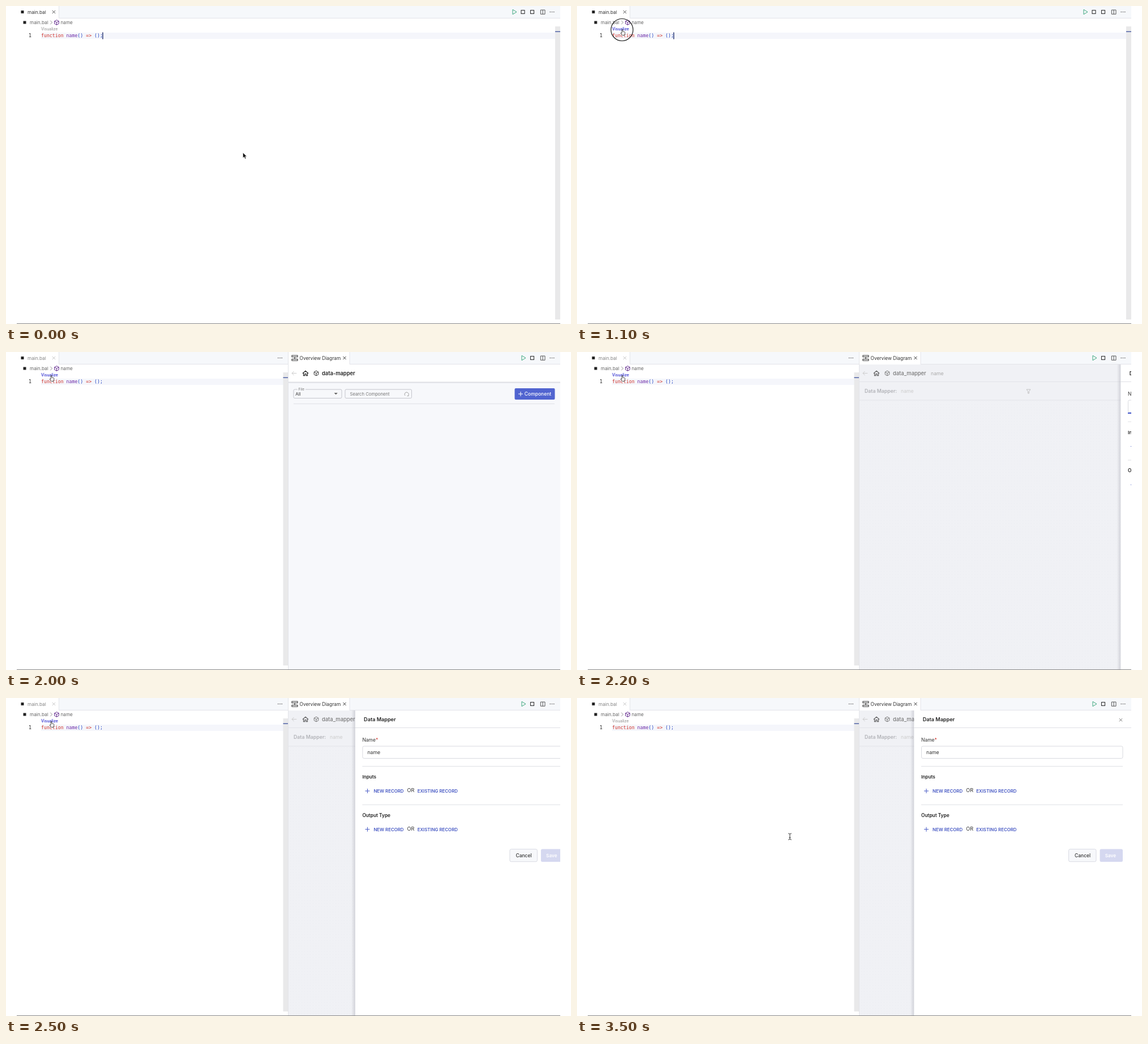
Write an HTML page that moves like this. It is 998 px wide and 561 px high and loops after 5.1 s.

```html
<!DOCTYPE html>
<html lang="en">
<head>
<meta charset="utf-8">
<title>Data mapper</title>
<style>
html, body { margin: 0; width: 100%; height: 100%; overflow: hidden; background: #fff; }
svg { display: block; width: 100%; height: 100%; }
text { font-family: Inter, Roboto, sans-serif; font-size: 8.2px; fill: #333; white-space: pre; }
.mono { font-family: "DejaVu Sans Mono", "Noto Sans Mono", monospace; font-size: 8.23px; fill: #1a3fc0; }
.key { fill: #d0342c; }
.fn { fill: #6f2da8; }
.crumb { fill: #666; }
.mid { font-weight: 500; }
.bold { font-weight: 600; fill: #222; }
.link { font-weight: 600; font-size: 7.85px; fill: #4759c4; }
.line { fill: none; stroke: currentColor; }
.rule { stroke: #dfe0e5; }
.edge { stroke: #e3e4e9; }
</style>
</head>
<body>
<svg viewBox="0 0 998 561" preserveAspectRatio="none">
  <defs>
    <path id="close" class="line" d="M-2.6-2.6 2.6 2.6M2.6-2.6-2.6 2.6"/>
    <path id="plus" class="line" d="M-4 0H4M0-4V4"/>
    <g id="dots" fill="#444"><circle cx="-3.2" r=".8"/><circle r=".8"/><circle cx="3.2" r=".8"/></g>
    <path id="play" d="M-3-4.2 4 0-3 4.2Z" fill="none" stroke="#3aa57c"/>
    <rect id="stop" x="-3" y="-3" width="6" height="6" fill="none" stroke="#333" stroke-width="1.1"/>
    <path id="cube" class="line" d="M0-4.3 3.8-2.2V2.2L0 4.3-3.8 2.2V-2.2ZM-3.8-2.2 0 0 3.8-2.2M0 0V4.3"/>
    <path id="home" d="M-5 .3 0-4.3 5 .3M-3.5-.5V4.2H-1.2V1H1.2V4.2H3.5V-.5" fill="none" stroke="#222" stroke-width="1.2"/>
    <path id="back" class="line" d="M4.3 0H-4M-.5-3.5-4 0-.5 3.5"/>
    <g id="choice">
      <use href="#plus" x="617" color="#4759c4"/>
      <text class="link" x="628" y="2.9">NEW RECORD</text>
      <text x="687.2" y="2.3" style="font-size:9.1px">OR</text>
      <text class="link" x="705.3" y="2.9">EXISTING RECORD</text>
    </g>
    <pattern id="grid" width="5" height="5" patternUnits="userSpaceOnUse">
      <circle cx="2.5" cy="2.5" r=".45" fill="#e4e6ed"/>
    </pattern>
    <linearGradient id="shade"><stop stop-color="#667" stop-opacity="0"/><stop offset="1" stop-color="#667" stop-opacity=".22"/></linearGradient>
    <clipPath id="side"><path d="M499 22H979V560H499Z"/></clipPath>
  </defs>

  <rect width="998" height="561" fill="#fff"/>

  <!-- editor -->
  <rect x="19" width="960" height="21.5" fill="#f6f8fb"/>
  <path class="edge" d="M94 21.5H979"/>
  <path d="M19 0H93.5V22H19Z" fill="#fff"/>
  <path class="edge" d="M93.5 0V21.5"/>
  <rect x="26.5" y="8" width="5" height="5" fill="#222"/>
  <g id="tab">
    <text x="38" y="13.7">main.bal</text>
    <use href="#close" x="84.5" y="10.5" color="#444"/>
  </g>
  <rect x="30.5" y="26.5" width="5" height="5" fill="#222"/>
  <text class="crumb" x="42" y="32">main.bal</text>
  <path d="M78.3 25.7 81.5 29 78.3 32.3" fill="none" stroke="#777" stroke-width=".8"/>
  <use href="#cube" x="89.5" y="29" color="#652d90"/>
  <text class="crumb" x="96.5" y="32">name</text>
  <text id="lens" x="62" y="43" style="font-size:6.95px">Visualize</text>
  <path id="row" fill="#f5f6fb"/>
  <text class="mono" x="40" y="55" style="fill:#222">1</text>
  <text class="mono" x="62" y="55"><tspan class="key">function</tspan> <tspan class="fn">name</tspan>() <tspan class="key">=&gt;</tspan> ();</text>
  <g id="scroll">
    <rect x="970" y="36" width="9" height="517" fill="#e9e9ea"/>
    <rect x="970" y="44.5" width="9" height="1.5" fill="#5364a8"/>
  </g>
  <rect data-to="1200" x="170.2" y="46.5" width="1.4" height="12" fill="#1b2a6b"/>

  <!-- toolbar -->
  <g data-to="1200">
    <use href="#play" x="898" y="10.5"/>
    <use href="#stop" x="913" y="10.5"/>
    <use href="#stop" x="929.5" y="10.5"/>
  </g>
  <g data-from="1200">
    <use href="#dots" x="484" y="10.5"/>
    <path d="M499 0H607V22H499Z" fill="#fff"/>
    <path class="edge" d="M498.5 0V560M607 0V21.5"/>
    <text x="518.5" y="13.7" style="font-size:8.4px">Overview Diagram</text>
    <use href="#close" x="598" y="10.5" color="#333"/>
  </g>
  <g data-from="1300">
    <path d="M505 6H515V8.8H505ZM505 12.5H515V15.3H505ZM510 8.8V12.5" fill="none" stroke="#333" stroke-width="1.1"/>
    <use href="#play" x="914" y="10.5"/>
    <use href="#stop" x="929.5" y="10.5"/>
  </g>
  <path d="M944.3 7H952V14.3H944.3ZM948.1 7V14.3" fill="none" stroke="#444" stroke-width=".9"/>
  <use href="#dots" x="964.5" y="10.5"/>

  <g clip-path="url(#side)">
    <!-- overview -->
    <g data-from="2000" data-to="2100">
      <rect x="499" y="22" width="480" height="538" fill="#f7f8fb"/>
      <rect x="499" y="22" width="480" height="31" fill="#fff"/>
      <rect x="499" y="52.5" width="480" height="2.2" fill="#dfe0e5"/>
      <use href="#back" x="509" y="37.5" color="#ccc"/>
      <use href="#home" x="529" y="37.5"/>
      <use href="#cube" x="548" y="37.5" color="#333"/>
      <text class="bold" x="558" y="40.7" style="font-size:9.3px">data-mapper</text>
      <g fill="none" stroke="#c4c5cc">
        <rect x="508" y="66" width="85" height="15.5" rx="2"/>
        <rect x="599" y="66" width="117.5" height="15.5" rx="2"/>
        <path d="M705 77A3.6 3.6 0 1 1 711 76V77.5H708.5" stroke="#999" stroke-width=".9"/>
      </g>
      <rect x="515" y="64" width="14" height="4" fill="#f7f8fb"/>
      <text x="516.5" y="67.7" style="font-size:6.3px;fill:#777">File</text>
      <text x="511.3" y="77" style="font-size:7.9px">All</text>
      <path d="M579.6 72H585.8L582.7 75.2Z" fill="#666"/>
      <text x="607.5" y="76.5" style="font-size:7.7px;fill:#777">Search Component</text>
      <rect x="898.5" y="64" width="71" height="20" rx="2" fill="#5164d0"/>
      <use href="#plus" x="909" y="74" color="#fff"/>
      <text class="mid" x="915.8" y="77" style="font-size:8.5px;fill:#fff">Component</text>
      <path class="rule" d="M508 91.3H969"/>
    </g>

    <!-- diagram -->
    <g data-from="2100">
      <rect x="499" y="22" width="480" height="538" fill="#f0f1f5"/>
      <rect x="499" y="86" width="480" height="474" fill="url(#grid)"/>
      <path class="edge" d="M499 52.5H979M499 85H979"/>
      <use href="#back" x="509" y="37.5" color="#ccc"/>
      <use href="#home" x="529" y="37.5" opacity=".7"/>
      <use href="#cube" x="548" y="37.5" color="#777"/>
      <text class="mid" x="558" y="40.7" style="font-size:9.4px;fill:#777">data_mapper</text>
      <text x="625" y="40.7" style="font-size:8.7px;fill:#aaa">name</text>
      <text x="508" y="72.2" style="font-size:8.75px;font-weight:600;fill:#b2b3b8">Data Mapper:</text>
      <text x="572" y="72.2" style="font-size:8.7px;fill:#ccc">name</text>
      <path d="M794 66H801L798.4 69.5V73H796.6V69.5Z" fill="none" stroke="#bbb" stroke-width=".9"/>
    </g>

    <!-- form -->
    <g id="form" data-from="2200">
      <rect x="588.5" y="22" width="7" height="538" fill="url(#shade)"/>
      <rect x="595.5" y="22" width="400" height="538" fill="#fff"/>
      <path class="rule" d="M595.5 52.5H995"/>
      <text class="bold" x="610.7" y="41.4" style="font-size:9.1px">Data Mapper</text>
      <use href="#close" x="960.5" y="38.7" color="#777"/>
      <text x="608" y="76.8" style="font-size:8.5px">Name<tspan fill="#d0342c">*</tspan></text>
      <rect x="608.5" y="85" width="355.5" height="21.5" rx="2.5" fill="#fff" stroke="#d9dae0"/>
      <text x="617" y="99" style="font-size:8.7px">name</text>
      <g data-to="2500">
        <rect x="608" y="106.7" width="356" height="2.3" fill="#bac2ee"/>
        <rect id="bar" x="608" y="106.7" width="112" height="2.3" fill="#5567d0"/>
      </g>
      <g id="fields">
        <path class="rule" d="M608 120.5H964M608 188.3H964"/>
        <text class="bold" x="608" y="142">Inputs</text>
        <use href="#choice" y="164"/>
        <text class="bold" x="608" y="209.8" style="font-size:8.3px">Output Type</text>
        <use href="#choice" y="231.7"/>
        <rect x="868.5" y="266.7" width="48.5" height="22" rx="2.5" fill="#f7f8fb" stroke="#d9dbe3"/>
        <text class="mid" x="879" y="280.9" style="font-size:8.5px">Cancel</text>
        <rect x="923.5" y="266.5" width="40.5" height="22.5" rx="2.5" fill="#d5d8f0"/>
        <text class="bold" x="932.7" y="280.9" style="fill:#fff">Save</text>
      </g>
    </g>
  </g>
  <path d="M19 560.4H979" stroke="#858585"/>

  <!-- pointers -->
  <circle id="ring" data-from="900" data-to="1200" cx="79.5" cy="42" fill="none" stroke="#1a1a1a" stroke-width="1.2"/>
  <path id="arrow" d="M0 0V9.2L2.2 7.3 3.8 10.8 5.4 10.1 3.9 6.7H6.7Z" fill="#111" stroke="#fff" stroke-width=".5"/>
  <path id="hand" d="M79.2 46.5V42Q79.2 41 80 41T80.8 42V44.8L84 45.6Q85 46 84.8 47.5L84 51.5H79.8L77.3 48.2Q77.2 47 78.2 47.2L79.2 48.2Z" fill="#fff" stroke="#222" stroke-width=".8"/>
  <path id="beam" d="M-2.8-5.5Q0-5.5 0-4Q0-5.5 2.8-5.5M0-4V4M-2.8 5.5Q0 5.5 0 4Q0 5.5 2.8 5.5M-1.5 1.8H1.5" fill="none" stroke="#333"/>
</svg>
<script>
const LOOP = 5100, STEP = 100;
const $ = id => document.getElementById(id);
const timed = [...document.querySelectorAll('[data-from], [data-to]')];
const show = (el, on) => el.style.display = on ? '' : 'none';
const move = (el, x, y) => el.setAttribute('transform', `translate(${x} ${y})`);
const mix = (a, b, p) => a + (b - a) * p;
const ease = p => p * p * (3 - 2 * p);

// Horizontal offset of the form while it slides in
const slide = t => t < 2300 ? 365 : t < 2400 ? 214 : t < 2500 ? 88 : t < 2600 ? 21.4 : t < 2700 ? 3 : 0;

function draw(t) {
  for (const el of timed) {
    show(el, t >= (el.dataset.from || 0) && t < (el.dataset.to || LOOP));
  }
  const split = t >= 1200, hover = t >= 700 && t < 3100, press = t === 1600;

  $('tab').setAttribute('opacity', split ? .6 : 1);
  $('tab').lastElementChild.setAttribute('opacity', split ? .5 : 1);
  $('row').setAttribute('d', `M62 47H${split ? 490 : 970}V58H62Z`);
  move($('scroll'), split ? -480.5 : 0, 0);
  $('lens').style.fill = hover ? '#2222cc' : '#8a8a8a';
  $('lens').style.fontWeight = hover ? 500 : 400;

  $('ring').setAttribute('r', Math.min(19.5, 6.5 * (t - 800) / STEP));
  move($('form'), slide(t), 0);
  move($('fields'), 0, t < 2500 ? 2.5 : 0);
  $('bar').setAttribute('width', t < 2300 ? 60 : t < 2400 ? 112 : 200);

  show($('arrow'), t === 0 || press);
  move($('arrow'), press ? 78 : 418.5, press ? 41.5 : 258.8);
  show($('hand'), hover && !press);
  show($('beam'), t > 0 && !hover);
  if (t < 700) {
    const p = ease(t / 600);
    move($('beam'), mix(419, 99, p), mix(262, 51, p));
  } else {
    const p = ease(Math.min(1, Math.max(0, (t - 3000) / 500)));
    move($('beam'), mix(80, 376, p), mix(46, 244.5, p));
  }
}

function tick() {
  draw(Math.floor(performance.now() % LOOP / STEP) * STEP);
  requestAnimationFrame(tick);
}
tick();
</script>
</body>
</html>
```
